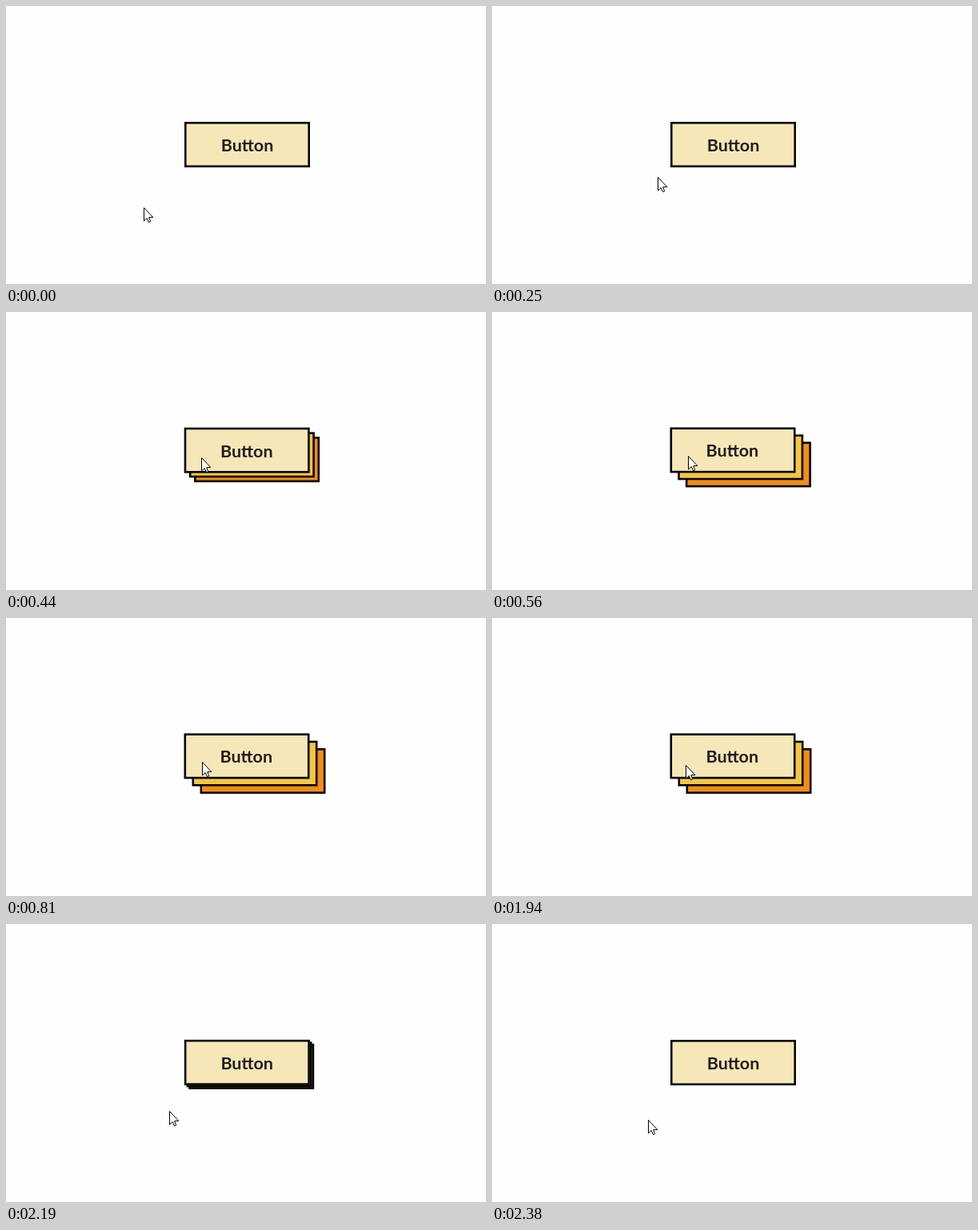
These frames come from a looping animation (600x348 px, 2.44 s). An HTML page with a canvas:

```html
<!DOCTYPE html>
<html lang="en">
<head>
<meta charset="utf-8">
<title>Stacked button hover</title>
<style>
  html, body { margin: 0; width: 100%; height: 100%; overflow: hidden; background: #fefefe; }
  canvas { display: block; }
</style>
</head>
<body>
<canvas id="stage" width="600" height="348"></canvas>
<script>
const ctx = document.getElementById('stage').getContext('2d');
const LOOP = 2440;
const STEP = 62.5;
const INK = '#050505';
const HOVER_IN = 330;
const HOVER_OUT = 2056;
const FADE = 300;

// Pointer path: [step, x, y]
const PATH = [
  [0, 172, 252], [1, 176, 248], [4, 207, 214], [6, 234, 191], [7, 244, 182],
  [8, 245, 180], [30, 245, 180], [31, 242, 184], [32, 234, 196],
  [34, 211, 225], [36, 199, 240], [38, 195, 245]
];
const ARROW = [[0, 0], [0, 16.5], [3.7, 13], [6, 18.2], [8.2, 17.3], [6.2, 12.2], [11.3, 12]];

const clamp = v => Math.max(0, Math.min(1, v));
const bezier = (a, b, u) => 3 * a * u * (1 - u) ** 2 + 3 * b * u * u * (1 - u) + u ** 3;

// CSS "ease": cubic-bezier(.25, .1, .25, 1)
function ease(p) {
  let lo = 0, hi = 1;
  for (let i = 0; i < 20; i++) {
    const mid = (lo + hi) / 2;
    if (bezier(0.25, 0.25, mid) < p) lo = mid; else hi = mid;
  }
  return bezier(0.1, 1, lo);
}

function slope(i, axis) {
  const a = PATH[i - 1], b = PATH[i], c = PATH[i + 1];
  if (!a || !c) return 0;
  const before = (b[axis] - a[axis]) / (b[0] - a[0]);
  const after = (c[axis] - b[axis]) / (c[0] - b[0]);
  return before * after <= 0 ? 0 : 2 * before * after / (before + after);
}

function pointerAt(step) {
  let i = 0;
  while (i < PATH.length - 2 && PATH[i + 1][0] <= step) i++;
  const a = PATH[i], b = PATH[i + 1];
  const span = b[0] - a[0];
  const u = clamp((step - a[0]) / span), v = 1 - u;
  return [1, 2].map(axis => Math.round(
    a[axis] * (1 + 2 * u) * v * v + b[axis] * u * u * (3 - 2 * u) +
    span * (slope(i, axis) * u * v * v - slope(i + 1, axis) * u * u * v)
  ));
}

function card(x, y, fill) {
  ctx.fillStyle = INK;
  ctx.fillRect(x, y, 157, 57);
  ctx.fillStyle = fill;
  ctx.fillRect(x + 2.6, y + 2.6, 151.8, 51.8);
}

function label(x, baseline) {
  ctx.font = '700 21.5px Lato, sans-serif';
  ctx.textAlign = 'left';
  ctx.fillStyle = '#221d1a';
  const left = x - ctx.measureText('Button').width / 2;
  ctx.fillText('Button', left, baseline);
  // Shared crossbar of the double t
  const start = left + ctx.measureText('But').width;
  ctx.fillRect(start - 4, baseline - 10.9, 7, 2);
}

function pointer(x, y) {
  ctx.beginPath();
  for (const [dx, dy] of ARROW) ctx.lineTo(x + dx + 0.5, y + dy + 0.5);
  ctx.closePath();
  ctx.fillStyle = '#fff';
  ctx.fill();
  ctx.strokeStyle = '#000';
  ctx.lineWidth = 1;
  ctx.stroke();
}

function draw(time) {
  const step = Math.min(38, Math.floor((time + 3) / STEP));
  const t = step * STEP;
  const hover = ease(clamp((t - HOVER_IN) / FADE)) - ease(clamp((t - HOVER_OUT) / FADE));
  const x = 223 - 0.5 * hover, y = 145 - 0.6 * hover;

  ctx.fillStyle = '#fefefe';
  ctx.fillRect(0, 0, 600, 348);
  if (hover > 0.001) {
    card(x + 20 * hover, y + 18.6 * hover, '#f28d18');
    card(x + 10 * hover, y + 9.2 * hover, '#f3c644');
  }
  card(x, y, '#f5e7b8');
  label(301.5 - 1.2 * hover, 182 - 0.6 * hover);
  pointer(...pointerAt(step));
}

function tick() {
  draw(performance.now() % LOOP);
  requestAnimationFrame(tick);
}
tick();
</script>
</body>
</html>
```
